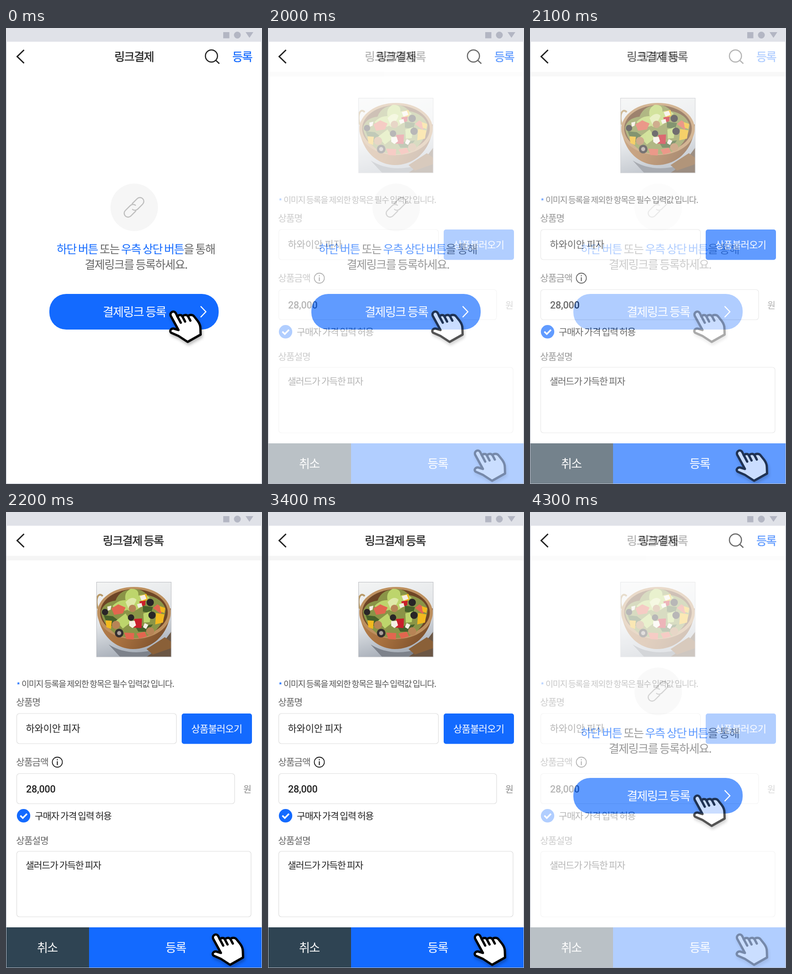
Animation of 561 by 998 pixels, one loop 4.4 s. Source, as an HTML page:

```html
<!DOCTYPE html>
<html lang="ko">
<head>
<meta charset="utf-8">
<title>링크결제</title>
<style>
  html, body { margin: 0; width: 100%; height: 100%; overflow: hidden; background: #fff; }
  svg { display: block; width: 561px; height: 998px; }
  text { font: 20.5px "Noto Sans CJK KR", "Noto Sans KR", "Noto Sans CJK", sans-serif; letter-spacing: -.06em; word-spacing: -1.4px; fill: #222; }
  .title { font-size: 25px; stroke: #222; stroke-width: .45; }
  .action { font-size: 25px; fill: #136aff; stroke: #136aff; stroke-width: .45; }
  .guide { font-size: 25px; fill: #666; }
  .guide tspan, .star { fill: #136aff; }
  .big { font-size: 26px; fill: #fff; }
  .note { font-size: 18.5px; letter-spacing: -1.27px; fill: #555; }
  .star { font-size: 18px; }
  .label { fill: #666; }
  .name { font-size: 21px; letter-spacing: -.2px; }
  .load { font-size: 21px; letter-spacing: -.75px; fill: #fff; }
  .price { font: 500 21.5px Roboto, sans-serif; letter-spacing: -.2px; }
  .won { font-size: 19.5px; fill: #888; }
  .blue { fill: #136aff; }
  .field { fill: #fff; stroke: #ddd; stroke-width: 1.2; }
  .line { fill: none; stroke: #222; }
  .hand { filter: drop-shadow(2px 5px 3px rgba(0, 0, 0, .26)); }
  .in { animation: fade 4.4s step-end infinite; }
  .out { --a: 1; --b: .6667; --c: .3333; --d: 0; animation: fade 4.4s step-end infinite; }
  @keyframes fade {
    0% { opacity: var(--a, 0); }
    45.4545% { opacity: var(--b, .3333); }
    47.7272% { opacity: var(--c, .6667); }
    50% { opacity: var(--d, 1); }
    95.4545% { opacity: var(--c, .6667); }
    97.7272% { opacity: var(--b, .3333); }
    100% { opacity: var(--a, 0); }
  }
</style>
</head>
<body>
<svg viewBox="0 0 561 998">
  <defs>
    <path id="back" class="line" d="M39.500 48 24.500 62.500 39.500 77" stroke-width="3"/>
    <g id="hand" class="hand" stroke="#000" stroke-width="5" stroke-linejoin="round" stroke-linecap="round">
      <path fill="#fff" d="M361 630C358 622 368 617 372 624L376 632C378 627 385 627 387 632C389 627 396 627 399 631C401 627 409 627 412 631L420 641Q426 649 426 657L426.500 671 398 687 378 674 362 667C357 663 362 657 368 658L378 661Z"/>
      <path fill="none" d="M375 630 383 645M387 632 392.500 642.500M399 631 404 640.500"/>
    </g>
    <linearGradient id="table" x2=".25" y2="1">
      <stop offset="0" stop-color="#f3f4f4"/>
      <stop offset=".55" stop-color="#e2e5e8"/>
      <stop offset="1" stop-color="#a9b0ba"/>
    </linearGradient>
    <linearGradient id="wood" x2="1" y2=".3">
      <stop offset="0" stop-color="#b78352"/>
      <stop offset=".5" stop-color="#a8713f"/>
      <stop offset="1" stop-color="#80532e"/>
    </linearGradient>
    <clipPath id="crop"><rect x="199" y="154" width="163" height="163"/></clipPath>
  </defs>

  <g id="intro">
    <use href="#back"/>
    <text class="title" x="237.500" y="71.500">링크결제</text>
    <g class="line" stroke-width="2.5">
      <circle cx="450.200" cy="61.300" r="13.200"/>
      <path d="M459.500 70.500 467.500 78"/>
    </g>
    <text class="action" x="496" y="71.500">등록</text>

    <circle cx="281" cy="392.500" r="52" fill="#f6f6f6"/>
    <g transform="translate(280.500 392.500) rotate(-45)" fill="none" stroke="#bebebe" stroke-width="2.4" stroke-linecap="round">
      <path id="link" d="M3-8.500H18.400A8.500 8.500 0 0 1 18.400 8.500H3A8.500 8.500 0 0 1-5.500 1"/>
      <use href="#link" transform="rotate(180)"/>
    </g>

    <text class="guide" x="111" y="492.500"><tspan>하단 버튼</tspan> 또는 <tspan>우측 상단 버튼</tspan>을 통해</text>
    <text class="guide" x="172.500" y="527">결제링크를 등록하세요.</text>

    <rect class="blue" x="95" y="582" width="371" height="78" rx="37"/>
    <text class="big" x="212" y="630.500">결제링크 등록</text>
    <path d="M426.500 609 438 621 426.500 633" fill="none" stroke="#fff" stroke-width="2.4"/>
  </g>

  <g id="form" class="in">
    <rect y="30" width="561" height="968" fill="#fff"/>
    <use href="#back"/>
    <text class="title" x="212" y="71.500">링크결제 등록</text>
    <rect y="96" width="561" height="10" fill="#f5f5f5"/>

    <g clip-path="url(#crop)">
      <rect x="198" y="153" width="165" height="165" fill="url(#table)"/>
      <path d="M212 222Q196 212 199 190Q203 176 212 184" fill="none" stroke="#b99a68" stroke-width="4"/>
      <path d="M225 290Q270 318 330 300L310 317H250Z" fill="#7d828b"/>
      <path d="M308 317Q335 300 362 262V317Z" fill="#6b5644"/>
      <path d="M308 300 348 274 362 284V298L322 312Z" fill="#8a6038"/>
      <path d="M200 215C203 264 234 299 278 300C326 300 360 262 361 211Z" fill="url(#wood)"/>
      <ellipse cx="280.500" cy="221" rx="80.500" ry="57" fill="#bd905f"/>
      <ellipse cx="280.500" cy="220" rx="74" ry="51" fill="#6d4526"/>
      <path d="M208 218Q214 197 240 194Q248 172 272 170Q294 164 310 182Q342 188 350 213Q347 246 318 268Q280 284 242 268Q212 248 208 218Z" fill="#8a9447"/>
      <g fill="#46602a">
        <path d="M214 226 234 228 250 240 240 252 222 246ZM300 205 322 208 318 222 300 218ZM284 252 306 248 322 246 310 262 290 262Z"/>
      </g>
      <g fill="#bdd56c">
        <path d="M233 206Q246 192 262 193Q258 175 274 168Q292 168 290 183Q306 177 315 188Q301 194 293 210Q276 222 266 214Q250 221 233 206Z"/>
        <path d="M241 238 262 222 274 241 256 255ZM301 222 318 217 315 241 302 242Z"/>
      </g>
      <path d="M262 197Q276 182 286 192Q280 210 268 211Z" fill="#dfe9a8"/>
      <g fill="#e2664f">
        <path d="M231 211 246 202 262 209 256 222 237 225ZM322 210 332 202 346 212 339 223ZM259 264 281 265 280 279 264 278ZM286 266 304 262 309 272 292 277Z"/>
        <path d="M281 234 298 233 297 254 280 253ZM292 196 306 192 305 204 296 207Z" fill="#c91f2b"/>
      </g>
      <path d="M329 221 347 224 344 242 327 246ZM218 237 232 238 230 256 220 252ZM294 183 308 179 310 193 298 195ZM337 206 349 210 347 221 339 218Z" fill="#f2b91f"/>
      <g fill="#292527">
        <circle cx="320" cy="226" r="8"/>
        <circle cx="316" cy="198" r="8"/>
        <circle cx="274" cy="231" r="7"/>
        <circle cx="217" cy="219" r="7"/>
      </g>
      <circle cx="248" cy="265" r="7" fill="#aaa09a" stroke="#322d2e" stroke-width="5"/>
      <g fill="#b78456">
        <circle cx="241" cy="247" r="9"/>
        <circle cx="316" cy="261" r="9"/>
        <circle cx="277" cy="211" r="8"/>
      </g>
      <path d="M270 239 282 238 285 248 277 254 270 249ZM293 184 304 181 308 190 297 194ZM304 243 312 247 307 256 300 252ZM222 207 231 205 229 214 223 216ZM287 202 297 199 299 207 290 210Z" fill="#f5efe4"/>
    </g>
    <rect x="198.500" y="153.500" width="163.500" height="163.500" fill="none" stroke="#b9bbc0"/>

    <text class="star" x="23" y="386">*</text>
    <text class="note" x="34" y="382.500">이미지 등록을 제외한 항목은 필수 입력값 입니다.</text>

    <text class="label" x="22" y="423.500">상품명</text>
    <rect class="field" x="23.500" y="441" width="350" height="66" rx="6"/>
    <text class="name" x="43.500" y="481">하와이안 피자</text>
    <rect class="blue" x="385" y="441" width="154" height="66.500" rx="5"/>
    <text class="load" x="406" y="482">상품불러오기</text>

    <text class="label" x="22" y="555">상품금액</text>
    <circle class="line" cx="112.500" cy="547.500" r="11" stroke-width="1.8"/>
    <path class="line" d="M112.500 545.500V554M112.500 541V543.300" stroke-width="2.2"/>
    <rect class="field" x="23.500" y="572.500" width="477.500" height="66" rx="6"/>
    <text class="price" x="44" y="614">28,000</text>
    <text class="won" x="520" y="613.500">원</text>

    <circle class="blue" cx="38.500" cy="664.800" r="14.700"/>
    <path d="M31.500 664.500 36.800 669.800 46 660.500" fill="none" stroke="#fff" stroke-width="3.5"/>
    <text x="63" y="672.500">구매자 가격 입력 허용</text>

    <text class="label" x="22" y="726.500">상품설명</text>
    <rect class="field" x="23.500" y="742.500" width="513.500" height="143.500" rx="6"/>
    <text x="43" y="780.500">샐러드가 가득한 피자</text>

    <rect y="909" width="182" height="89" fill="#2f4453"/>
    <rect class="blue" x="182" y="909" width="379" height="89"/>
    <text class="big" x="68" y="963">취소</text>
    <text class="big" x="349.500" y="963">등록</text>
  </g>

  <g class="out"><use href="#hand"/></g>
  <g class="in"><use href="#hand" x="93" y="304"/></g>

  <path d="M.5 30V997.500H560.500V30" fill="none" stroke="#b9bcc8"/>
  <rect width="561" height="30" fill="#e0e2e8"/>
  <g fill="#b3b6c3">
    <rect x="476" y="9" width="13.500" height="13.500"/>
    <circle cx="507" cy="15.500" r="7.500"/>
    <path d="M525 9H542L533.500 21.500Z"/>
  </g>
</svg>
</body>
</html>
```
